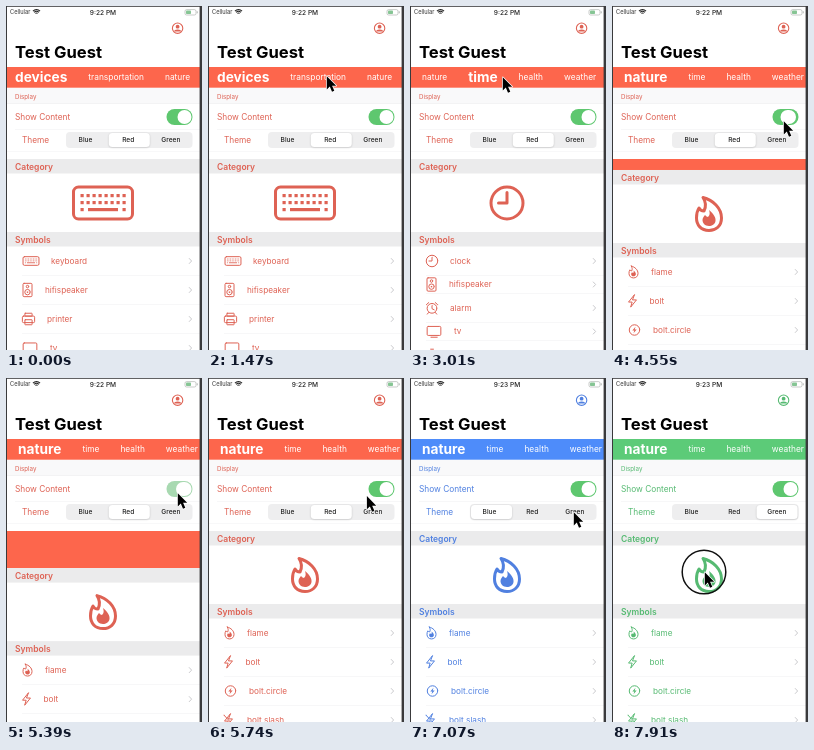
An HTML page with a canvas for the animation above (8000 ms loop, 196 px wide and 344 px high).

```html
<!DOCTYPE html>
<html lang="en">
<head>
<meta charset="utf-8">
<title>Symbol browser</title>
<style>
html, body { margin: 0; width: 100%; height: 100%; overflow: hidden; background: #fff; }
canvas { display: block; width: 196px; height: 344px; }
</style>
</head>
<body>
<canvas id="stage"></canvas>
<script>
const W = 196, H = 344, LOOP = 8000, STEP = 70;
const canvas = document.getElementById('stage');
const ctx = canvas.getContext('2d');
const ratio = Math.max(1, window.devicePixelRatio || 1);
canvas.width = W * ratio;
canvas.height = H * ratio;

const FONT = 'Inter, "Liberation Sans", sans-serif';
const THEMES = [
  { bar: [78, 140, 250], ink: [80, 128, 224] },
  { bar: [253, 102, 76], ink: [222, 98, 84] },
  { bar: [92, 203, 120], ink: [86, 186, 114] }
];
const TABS = ['devices', 'transportation', 'nature', 'time', 'health', 'weather'];

// name: [icon centre x, label x]
const SPOTS = {
  keyboard: [25, 45], hifispeaker: [21.5, 39], printer: [22.5, 41], tv: [24, 44],
  clock: [22, 40], alarm: [22, 40], stopwatch: [22, 40], timer: [22, 40],
  flame: [21.5, 39], bolt: [20.5, 37.5], 'bolt.circle': [22.5, 41], 'bolt.slash': [20.5, 39]
};
const LISTS = {
  devices: ['keyboard', 'hifispeaker', 'printer', 'tv'],
  time: ['clock', 'alarm', 'stopwatch', 'timer'],
  nature: ['flame', 'bolt', 'bolt.circle', 'bolt.slash']
};
const PICKS = [[-1000, 'devices'], [2877, 'time'], [3700, 'nature']];
const THEME_PICKS = [[-1000, 1], [6450, 0], [7080, 2]];
const ROW = 29, TOP = 153;

const POINTER = [
  [950, 100, 350], [1400, 118, 69], [1720, 118, 69], [2200, 12, 72], [2330, 12, 72],
  [2750, 92, 70], [3260, 92, 70], [3600, 30, 71], [3800, 30, 71], [4360, 171, 114],
  [5580, 171, 114], [6230, 86, 133], [6560, 86, 133], [7000, 163, 133],
  [7560, 163, 133], [7770, 92, 193]
];

const clamp = v => Math.min(1, Math.max(0, v));
const span = (t, a, b) => clamp((t - a) / (b - a));
const mix = (a, b, p) => a + (b - a) * p;
const ease = p => p < 0.5 ? 4 * p ** 3 : 1 - 4 * (1 - p) ** 3;
const easeOut = p => 1 - (1 - p) ** 3;
const rgb = c => `rgb(${c.map(Math.round).join()})`;
const blend = (a, b, p) => a.map((v, i) => mix(v, b[i], p));

function rect(x, y, w, h, color) {
  ctx.fillStyle = color;
  ctx.fillRect(x, y, w, h);
}

function round(x, y, w, h, r, color) {
  ctx.beginPath();
  ctx.roundRect(x, y, w, h, r);
  ctx.fillStyle = color;
  ctx.fill();
}

function setFont(size, weight = 400) {
  ctx.font = `${weight} ${size}px ${FONT}`;
}

function text(str, x, y, size, color, weight = 400, align = 'left') {
  setFont(size, weight);
  ctx.textAlign = align;
  ctx.textBaseline = 'alphabetic';
  ctx.fillStyle = color;
  ctx.fillText(str, x, y);
}

function line(...p) {
  ctx.beginPath();
  for (let i = 0; i < p.length; i += 2) ctx.lineTo(p[i], p[i + 1]);
  ctx.stroke();
}

function ring(x, y, r) {
  ctx.beginPath();
  ctx.arc(x, y, r, 0, Math.PI * 2);
  ctx.stroke();
}

function box(x, y, w, h, r = 3) {
  ctx.beginPath();
  ctx.roundRect(x, y, w, h, r);
  ctx.stroke();
}

const FLAME = new Path2D('M-6-16.5C4-14 12.5-6 12.5 4C12.5 12 7 16.5 0 16.5C-8 16.5-12.5 11-12.5 4C-12.5 0-12-3-10-6C-9-4-7-3-5-3C-3-7-3-12-6-16.5Z');
const EMBER = new Path2D('M0-4C5 0 7 4 6.5 7C6 10.5 3 12 0 12C-4 12-6.5 9-6.5 6C-6.5 4-5 2-4 1C-3 2-2 3-1 3C1 1 1-1 0-4Z');
const BOLT = new Path2D('M5-17L-11 3L-1 3L-5 17L11-3L1-3Z');
const ARROW = new Path2D('M0 0V13.2L3 10.4L5.2 15.6L7.5 14.6L5.3 9.6H9.4Z');

const ICONS = {
  keyboard() {
    box(-29.5, -16, 59, 32, 5);
    for (let r = 0; r < 3; r++) {
      for (let c = 0; c < 8; c++) {
        if (r === 2 && c > 0 && c < 7) continue;
        ctx.fillRect(-22.5 + c * 6, -9 + r * 7, 3.2, 3.2);
      }
    }
    ctx.fillRect(-15, 5, 30, 3.2);
  },
  hifispeaker() {
    box(-12.5, -18.5, 25, 37);
    ring(0, 6, 7.5);
    ring(0, -9.5, 3.5);
    ctx.fillRect(-2, 4, 4, 4);
  },
  printer() {
    box(-17, -8, 34, 18);
    box(-10, -16, 20, 8, 1);
    box(-10, 2, 20, 14, 1);
  },
  tv() {
    box(-19, -14, 38, 25);
    line(-9, 16, 9, 16);
  },
  clock() {
    ring(0, 0, 16);
    line(0, -10.5, 0, 0, -8.5, 0);
  },
  alarm() {
    ring(0, 1, 13.5);
    line(0, -7, 0, 2, 6, 5);
    line(-16, -9, -9, -15);
    line(16, -9, 9, -15);
    line(-9, 12, -13, 17);
    line(9, 12, 13, 17);
  },
  stopwatch() {
    ring(0, 3, 14);
    line(0, -6, 0, 3);
    line(-4, -16, 4, -16);
    line(11, -9, 14, -12);
  },
  timer() {
    ctx.beginPath();
    ctx.arc(0, 0, 16, -Math.PI / 2, Math.PI * 1.25);
    ctx.stroke();
    line(-7, -7, 0, 0);
    line(0, -16, 0, -10);
  },
  flame() {
    ctx.stroke(FLAME);
    ctx.fill(EMBER);
  },
  bolt() {
    ctx.stroke(BOLT);
  },
  'bolt.circle'() {
    ring(0, 0, 14.5);
    ctx.scale(0.55, 0.55);
    ctx.fill(BOLT);
  },
  'bolt.slash'() {
    ctx.stroke(BOLT);
    line(-13, -14, 13, 14);
  }
};

function icon(name, x, y, scale, weight, color) {
  ctx.save();
  ctx.translate(x, y);
  ctx.scale(scale, scale);
  ctx.lineWidth = weight / scale;
  ctx.lineCap = ctx.lineJoin = 'round';
  ctx.strokeStyle = ctx.fillStyle = color;
  ICONS[name]();
  ctx.restore();
}

// Current and previous choice, with the time since the change.
function choice(picks, t) {
  let i = picks.length - 1;
  while (picks[i][0] > t) i--;
  return { now: picks[i][1], old: picks[Math.max(0, i - 1)][1], age: t - picks[i][0] };
}

function statusBar(t, ink) {
  text('Cellular', 4, 8.2, 5.7, '#333');
  ctx.strokeStyle = '#222';
  ctx.lineWidth = 1.1;
  ctx.lineCap = 'butt';
  for (const r of [1.6, 3.3, 5]) {
    ctx.beginPath();
    ctx.arc(30.5, 8.6, r, -Math.PI * 0.75, -Math.PI * 0.25);
    ctx.stroke();
  }
  text(t < 7000 ? '9:22 PM' : '9:23 PM', 97, 8.7, 6.6, '#222', 500, 'center');
  ctx.lineWidth = 0.6;
  ctx.strokeStyle = '#a4aaa6';
  box(179, 3.6, 11, 5.4, 1.6);
  round(180, 4.6, 5, 3.4, 0.8, '#86c594');
  rect(190.8, 5.3, 0.8, 2, '#a4aaa6');

  ctx.strokeStyle = ink;
  ctx.lineWidth = 1.1;
  ring(171.6, 22.2, 5.2);
  ctx.fillStyle = ink;
  ctx.beginPath();
  ctx.arc(171.6, 20.7, 1.9, 0, 7);
  ctx.fill();
  ctx.beginPath();
  ctx.ellipse(171.6, 25.6, 3.5, 2.2, 0, Math.PI, 0);
  ctx.fill();
  text('Test Guest', 9, 52, 16.6, '#000', 700);
}

function tabBar(t, pick, bar) {
  rect(0, 61, W, 20.7, bar);
  const grow = easeOut(clamp(pick.age / 130));
  let x = 0, natureX = 0;
  const items = TABS.map(name => {
    let big = 0;
    if (name === pick.now) big = grow;
    else if (name === pick.old) big = 1 - grow;
    const size = mix(8.4, 13.7, big), weight = big > 0.5 ? 700 : 400;
    setFont(size, weight);
    const item = { name, x, size, weight, y: mix(74.2, 76, big) };
    if (name === 'nature') natureX = x;
    x += ctx.measureText(name).width + 21;
    return item;
  });
  const left = mix(9, 12 - natureX, easeOut(span(t, 1740, 2480)));
  for (const i of items) text(i.name, left + i.x, i.y, i.size, '#fff', i.weight);
}

function toggle(t) {
  const off = t < 5200;
  const knob = off ? 1 - ease(span(t, 4490, 4660)) : ease(span(t, 5250, 5380));
  const tint = off ? 1 - span(t, 4560, 4780) : span(t, 5250, 5550);
  round(160.5, 103, 26, 16, 8, rgb(blend([232, 232, 234], [94, 199, 111], tint)));
  const w = t > 4450 && t < 5500 ? 15.5 : 14;
  round(mix(161.5, 185.5 - w, knob), 104, w, 14, 7, '#fff');
}

function settings(t, theme, ink) {
  rect(0, 82, W, 15.5, '#f9f9fa');
  text('Display', 9, 93, 6.2, ink);
  rect(0, 97.2, W, 0.5, '#e8e8ea');
  text('Show Content', 9, 114, 8.3, ink);
  toggle(t);
  rect(9, 123.5, W, 0.5, '#eeeef0');
  text('Theme', 16, 137, 8.3, ink);
  round(60, 126, 126.5, 16, 4, '#eeeeef');
  const slot = mix(theme.old, theme.now, ease(clamp(theme.age / 220)));
  ctx.save();
  ctx.shadowColor = 'rgba(0,0,0,.2)';
  ctx.shadowBlur = 2 * ratio;
  ctx.shadowOffsetY = 0.5 * ratio;
  round(61 + slot * 41.8, 127, 41, 14, 3.5, '#fff');
  ctx.restore();
  ['Blue', 'Red', 'Green'].forEach((s, i) =>
    text(s, 79.5 + i * 42.7, 136.4, 6.6, '#222', 500, 'center'));
  rect(0, 145.5, W, 0.5, '#f1f1f3');
}

// During a change, leftover rows sit between the new ones and collapse.
function rowsFor(pick) {
  const next = LISTS[pick.now], prev = LISTS[pick.old];
  const p = clamp(pick.age / 350);
  const rows = next.map(name => ({ name, h: ROW, alpha: 1 }));
  if (p < 1 && next !== prev) {
    const fading = name => ({ name, h: ROW * (1 - p), alpha: clamp((1 - p) * 2) });
    rows.splice(1, 0, fading(prev[1]));
    rows.splice(3, 0, fading(prev[3]));
  }
  return rows;
}

function header(label, y, ink) {
  rect(0, y, W, 14.5, '#ebebec');
  text(label, 9, y + 11, 8.5, ink, 600);
}

function content(pick, ink) {
  rect(0, TOP, W, H, '#fff');
  header('Category', TOP, ink);
  icon(LISTS[pick.now][0], 97, 197, 1, 3, ink);
  header('Symbols', 226, ink);
  let y = 240.5;
  for (const { name, h, alpha } of rowsFor(pick)) {
    const mid = y + h / 2;
    const [ix, tx] = SPOTS[name];
    ctx.globalAlpha = alpha;
    icon(name, ix, mid, name === 'keyboard' ? 0.27 : 0.36, 1, ink);
    text(name, tx, mid + 2.8, 8.2, ink);
    ctx.strokeStyle = '#c4c4c8';
    ctx.lineWidth = 0.9;
    line(183, mid - 2.8, 185.6, mid, 183, mid + 2.8);
    y += h;
    rect(16, y - 0.3, W, 0.5, '#eeeef0');
    ctx.globalAlpha = 1;
  }
}

function pointer(t) {
  if (t < POINTER[0][0]) return;
  let i = POINTER.length - 1;
  while (POINTER[i][0] > t) i--;
  const a = POINTER[i], b = POINTER[i + 1] || a;
  const p = a === b ? 0 : span(t, a[0], b[0]);
  const s = p * p * (3 - 2 * p);
  const x = mix(a[1], b[1], s), y = mix(a[2], b[2], s);
  if (t >= 7910) {
    ctx.strokeStyle = '#111';
    ctx.lineWidth = 1.5;
    ring(x, y + 1, 21.8);
  }
  ctx.save();
  ctx.translate(x + 0.8, y + 1.2);
  ctx.lineJoin = 'round';
  ctx.lineWidth = 1.4;
  ctx.strokeStyle = '#fff';
  ctx.stroke(ARROW);
  ctx.fillStyle = '#000';
  ctx.fill(ARROW);
  ctx.restore();
}

function draw(t) {
  ctx.setTransform(ratio, 0, 0, ratio, 0, 0);
  rect(0, 0, W, H, '#fff');
  const pick = choice(PICKS, t);
  const theme = choice(THEME_PICKS, t);
  const fade = clamp(theme.age / 140);
  const tone = key => rgb(blend(THEMES[theme.old][key], THEMES[theme.now][key], fade));
  const bar = tone('bar'), ink = tone('ink');

  statusBar(t, ink);
  tabBar(t, pick, bar);
  settings(t, theme, ink);

  const drop = t < 5000 ? ease(span(t, 4460, 4830)) : 1 - ease(span(t, 5155, 5525));
  const shift = drop * (H - TOP);
  if (shift > 0) rect(0, TOP, W, H - TOP, bar);
  ctx.save();
  ctx.translate(0, shift);
  content(pick, ink);
  ctx.restore();

  // Device bezel
  rect(0, 0, W, 0.8, '#3a3a3c');
  rect(0, 0, 1, H, '#3a3a3c');
  rect(193.6, 0, 2.4, H, '#3a3a3c');
  pointer(t);
}

function tick() {
  const t = performance.now() % LOOP;
  draw(Math.floor(t / STEP) * STEP);
  requestAnimationFrame(tick);
}
tick();
</script>
</body>
</html>
```
